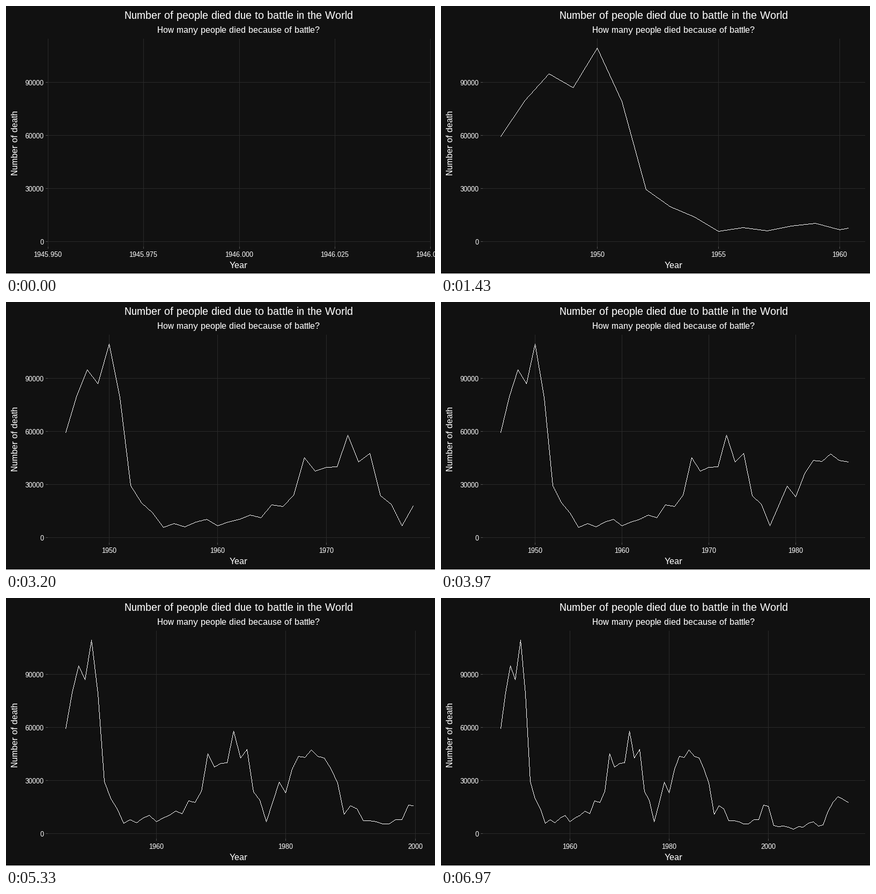
These frames come from a looping animation (800x500 px, 10 s). A matplotlib script:

```python
import math

import matplotlib.pyplot as plt
import numpy as np
from matplotlib.animation import FuncAnimation
from matplotlib.patches import PathPatch
from matplotlib.path import Path

W, H, DPI = 800, 500, 100
LOOP, FRAMES = 10000, 600
STEP = LOOP / FRAMES
LAST = 209
LEFT, RIGHT, TOP, BOTTOM = 78.1, 790.91, 61, 449
ZERO_Y, PX_PER_K = 439, 3.3
BG, GRID, TICK, INK = "#111111", "#2a2a2a", "#555555", "#ffffff"

# Deaths per year in thousands, 1946 to 2016
DEATHS = np.array([
    59.4, 79.7, 94.7, 87.1, 109.4, 79.0, 29.5, 19.7, 13.8, 5.8,
    8.0, 6.1, 8.9, 10.2, 6.8, 8.9, 10.4, 12.6, 11.3, 18.4,
    17.6, 23.9, 45.0, 37.6, 39.7, 40.1, 58.0, 42.8, 47.6, 23.6,
    18.9, 6.7, 18.0, 29.2, 22.9, 36.3, 43.5, 43.0, 47.4, 43.5,
    42.7, 36.5, 28.5, 10.9, 15.8, 13.9, 7.4, 7.4, 6.7, 5.5,
    5.5, 7.9, 7.9, 16.2, 15.6, 4.4, 3.9, 4.3, 3.6, 2.5,
    4.0, 3.7, 5.9, 6.7, 4.2, 4.7, 12.3, 18.0, 20.9, 19.5, 17.6])
YEARS = 1946 + np.arange(len(DEATHS))
KEYS = np.round(np.arange(len(DEATHS)) * LAST / (len(DEATHS) - 1))
# The view moves 30 times a second, on a 10 ms clock
MOVES = np.round(np.arange(LAST + 1) * 10 / 3) * 10

plt.rcParams.update({
    "font.family": "Liberation Sans",
    "text.hinting": "native",
    "text.hinting_factor": 1,
})


def nice_breaks(lo, hi, m=5):
    """Extended Wilkinson tick positions."""
    steps = (1, 5, 2, 2.5, 4, 3)
    span = hi - lo
    best, found = -2, (lo, span, 2)
    j = 1
    while True:
        for i, q in enumerate(steps):
            simple = 1 - i / 5 - j
            if 0.25 * (simple + 1) + 0.75 < best:
                a, step, k = found
                return [a + step * n for n in range(k)]
            k = 2
            while True:
                dense = 2 - (k - 1) / (m - 1) if k >= m else 1
                bound = 0.25 * (simple + 1) + 0.5 * dense + 0.05
                if bound + 0.2 < best:
                    break
                z = math.ceil(math.log10(span / (k + 1) / j / q))
                while True:
                    step = j * q * 10.0 ** z
                    width = step * (k - 1)
                    over = max(0, (width - span) / 2)
                    if bound + 0.2 * (1 - (over / (0.1 * span)) ** 2) < best:
                        break
                    first = (math.floor(hi / step) - k + 1) * j
                    final = math.ceil(lo / step) * j
                    for start in range(first, final + 1):
                        a = start * step / j
                        b = a + width
                        miss = (hi - b) ** 2 + (lo - a) ** 2
                        cover = 1 - 0.5 * miss / (0.1 * span) ** 2
                        ratio = (max(b, hi) - min(a, lo)) / step / (m - 1)
                        fit = 2 - max(ratio, 1 / ratio)
                        score = 0.25 * simple + 0.2 * cover + 0.5 * fit + 0.05
                        if score > best + 1e-9:
                            best, found = score, (a, step, k)
                    z += 1
                k += 1
        j += 1


def labels_for(values):
    for digits in range(4):
        if all(abs(v - round(v, digits)) < 5e-5 for v in values):
            break
    return [f"{v:.{digits}f}" for v in values]


def px(size):
    return size * 72 / DPI


def boxes(items):
    """One path of whole-pixel boxes, each given as x, y, width, height."""
    x, y, w, h = np.array(items, float).reshape(-1, 4).T
    corners = np.stack([x, y, x + w, y, x + w, y + h, x, y + h, x, y], axis=1)
    codes = [Path.MOVETO] + [Path.LINETO] * 3 + [Path.CLOSEPOLY]
    return Path(corners.reshape(-1, 2), np.tile(codes, len(x)))


def pixel_line(xs, ys):
    """Pixels of a polyline, stepped without smoothing."""
    xs, ys = np.round(xs), np.round(ys)
    n = np.maximum(np.abs(np.diff(xs)), np.abs(np.diff(ys)))
    at = np.append(0, np.cumsum(n))
    walk = np.arange(at[-1] + 1)
    px_x = np.round(np.interp(walk, at, xs))
    px_y = np.round(np.interp(walk, at, ys))
    one = np.ones_like(walk)
    return np.stack([px_x, px_y, one, one], axis=1)


fig = plt.figure(figsize=(W / DPI, H / DPI), dpi=DPI, facecolor=BG)
ax = fig.add_axes([0, 0, 1, 1])
ax.set(xlim=(0, W), ylim=(H, 0))
ax.axis("off")


def shape(color, items=()):
    return ax.add_patch(PathPatch(boxes(items), fc=color, lw=0, snap=False))


def label(x, y, text, size, ha="center", **kw):
    return ax.text(x, y, text, size=px(size), color=INK, ha=ha,
                   va="baseline", **kw)


levels = [(k, round(ZERO_Y - PX_PER_K * k)) for k in (0, 30, 60, 90)]
shape(GRID, [(78, y, 713, 1) for _, y in levels])
shape(TICK, [(74, y, 4, 1) for _, y in levels])
shape(INK, [(0, H - 1, W, 1)])
for k, y in levels:
    label(70.5, y + 6, str(k * 1000), 13, ha="right")

label(434, 24, "Number of people died due to battle in the World", 20)
label(434, 50, "How many people died because of battle?", 17)
label(434, 489, "Year", 17)
label(22, 255, "Number of death", 17, rotation=90, rotation_mode="anchor")

grid = shape(GRID)
ticks = shape(TICK)
curve = shape(INK)
names = [label(0, 468, "", 13) for _ in range(10)]


def draw(frame):
    move = np.searchsorted(MOVES, (frame + 1) * STEP) - 1
    now = np.interp(move, KEYS, YEARS)
    pad = 0.05 * (now - 1946) or 0.05
    lo, hi = 1946 - pad, now + pad

    def to_x(year):
        return LEFT + (RIGHT - LEFT) * (year - lo) / (hi - lo)

    breaks = [b for b in nice_breaks(lo, hi) if lo - 1e-6 <= b <= hi + 1e-6]
    cols = [round(to_x(b)) for b in breaks]
    grid.set_path(boxes([(x, TOP, 1, BOTTOM - TOP) for x in cols]))
    ticks.set_path(boxes([(x, BOTTOM, 1, 4) for x in cols]))
    texts = labels_for(breaks)
    for n, name in enumerate(names):
        on = n < len(cols)
        name.set_text(texts[n] if on else "")
        name.set_x(cols[n] if on else 0)

    past = YEARS < now
    xs = np.append(YEARS[past], now)
    ys = np.append(DEATHS[past], np.interp(now, YEARS, DEATHS))
    trail = pixel_line(to_x(xs), ZERO_Y - PX_PER_K * ys)
    curve.set_path(boxes(trail if move > 0 else []))
    return [grid, ticks, curve, *names]


anim = FuncAnimation(fig, draw, frames=FRAMES, interval=STEP,
                     init_func=lambda: draw(0), repeat=True, repeat_delay=0)
plt.show()
```
